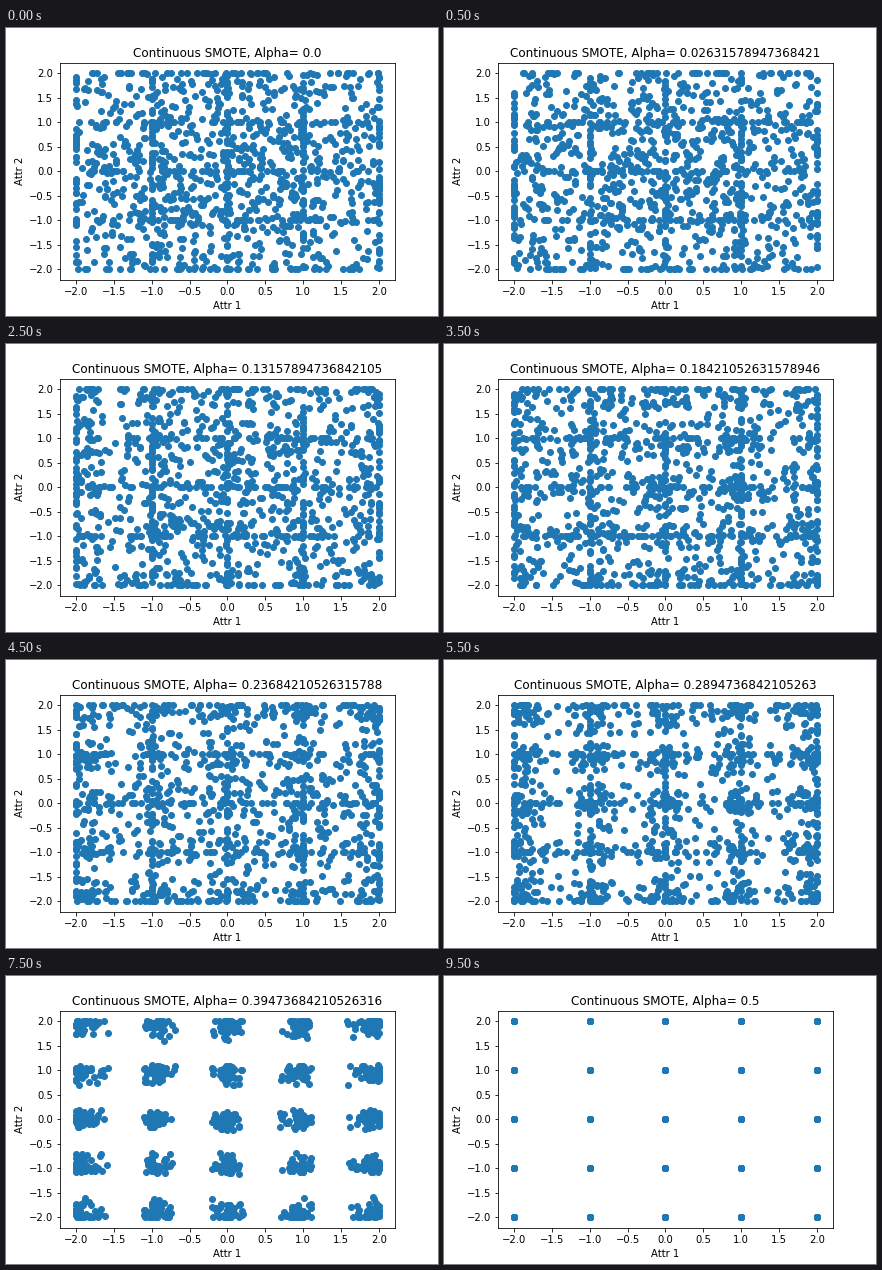
Recreate the animation shown at these times as a matplotlib script. Size 432 by 288 pixels, loop 10 s.

```python
import numpy as np
import matplotlib.pyplot as plt
from matplotlib.animation import FuncAnimation

plt.rcParams["text.kerning_factor"] = 6  # whole-pixel letter spacing

N_POINTS = 1200
ALPHAS = np.linspace(0, 0.5, 20)
TICKS = np.arange(-2, 2.1, 0.5)
GRID = np.array([(x, y) for x in range(-2, 3) for y in range(-2, 3)], float)


def sample(step):
    """Move each base point toward another one, with a separate gap per attribute."""
    rng = np.random.default_rng(100 + step)
    index = np.arange(N_POINTS)
    base = index % len(GRID)
    # Pair every grid point equally often with each of the others.
    other = (base + 1 + index // len(GRID) % (len(GRID) - 1)) % len(GRID)
    gap = rng.random((N_POINTS, 2)) * (0.5 - ALPHAS[step])
    return GRID[base] + gap * (GRID[other] - GRID[base])


fig, ax = plt.subplots(figsize=(6, 4), dpi=72)
fig.subplots_adjust(left=0.125, right=0.9, bottom=0.125, top=0.88)
points = ax.scatter(*sample(0).T)
ax.set(xlim=(-2.21, 2.21), ylim=(-2.215, 2.215), xticks=TICKS, yticks=TICKS,
       xlabel="Attr 1", ylabel="Attr 2")
title = ax.set_title("")


def update(step):
    points.set_offsets(sample(step))
    title.set_text(f"Continuous SMOTE, Alpha= {float(ALPHAS[step])}")
    return points, title


anim = FuncAnimation(fig, update, frames=len(ALPHAS), interval=500,
                     repeat=True, repeat_delay=0)
plt.show()
```
